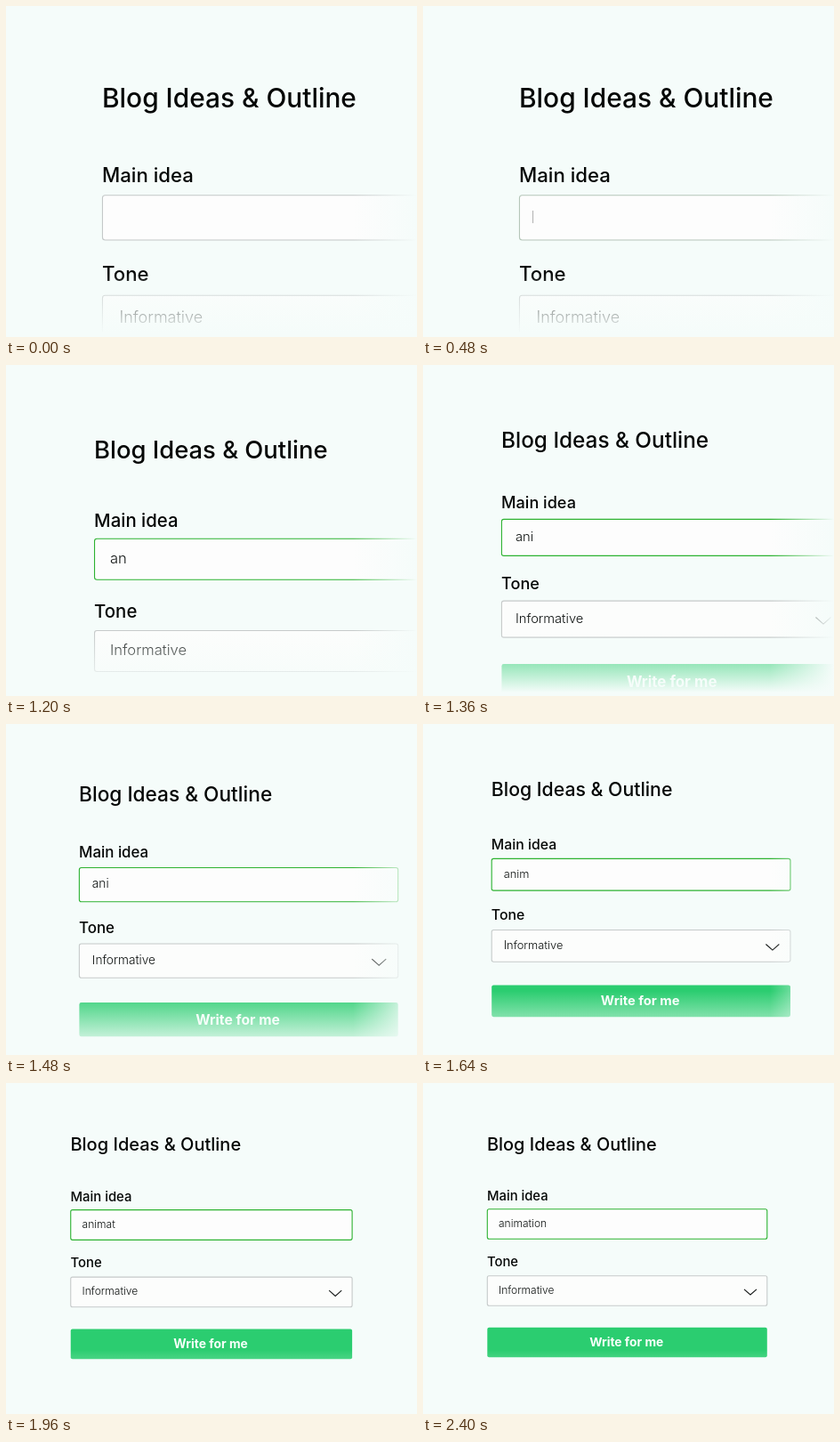
An HTML page with a canvas for the animation above (3280 ms loop, 462 px wide and 372 px high).

```html
<!DOCTYPE html>
<html lang="en">
<head>
<meta charset="utf-8">
<title>Form zoom</title>
<style>
  html, body { margin: 0; width: 100%; height: 100%; overflow: hidden; background: #f5fcfa; }
  canvas { display: block; }
</style>
</head>
<body>
<canvas id="stage" width="462" height="372"></canvas>
<script>
const ctx = document.getElementById('stage').getContext('2d');
const W = 462, H = 372, LOOP = 3280, TICK = 40;
const BG = '245,252,250';
const ZOOM_START = 1000, ZOOM_TIME = 1120;
const TYPE_START = 1010, KEY_TIME = 172, FOCUS_START = 440;
const WORD = 'animation';

const clamp = v => Math.min(1, Math.max(0, v));
const mix = (a, b, k) => `rgb(${a.map((v, i) => Math.round(v + (b[i] - v) * k))})`;

// cubic-bezier(.25, .1, .25, 1), solved by bisection
function ease(x) {
  const curve = (a, b, u) => 3 * (1 - u) ** 2 * u * a + 3 * (1 - u) * u * u * b + u ** 3;
  let lo = 0, hi = 1;
  for (let i = 0; i < 24; i++) {
    const mid = (lo + hi) / 2;
    if (curve(0.25, 0.25, mid) < x) lo = mid; else hi = mid;
  }
  return curve(0.1, 1, lo);
}

function text(str, x, y, size, weight, color, align = 'left') {
  ctx.font = `${weight} ${size}px Inter, "Open Sans", sans-serif`;
  ctx.textAlign = align;
  ctx.fillStyle = color;
  ctx.fillText(str, x, y);
}

const label = (str, y, size) => text(str, 72, y, size, 450, '#050706');
const value = (str, y) => text(str, 85, y, 12, 330, '#101413');

function box(y, fill, stroke) {
  ctx.beginPath();
  ctx.roundRect(72.3, y, 314.5, 33.5, 2);
  ctx.fillStyle = fill;
  ctx.fill();
  if (stroke) {
    ctx.strokeStyle = stroke;
    ctx.stroke();
  }
}

function fade(x0, y0, x1, y1) {
  const g = ctx.createLinearGradient(x0, y0, x1, y1);
  g.addColorStop(0, `rgba(${BG},0)`);
  g.addColorStop(1, `rgba(${BG},1)`);
  ctx.fillStyle = g;
  ctx.fillRect(x0, y0, W - x0, H - y0);
}

function draw(t) {
  const scale = 1.5 - 0.5 * ease(clamp((t - ZOOM_START) / ZOOM_TIME));
  const focus = clamp((t - FOCUS_START) / 400);
  const typed = t < TYPE_START ? 0 : Math.floor((t - TYPE_START) / KEY_TIME) + 1;

  ctx.setTransform(1, 0, 0, 1, 0, 0);
  ctx.fillStyle = `rgb(${BG})`;
  ctx.fillRect(0, 0, W, H);

  ctx.scale(scale, scale);
  ctx.lineWidth = 1.1 / scale;

  label('Blog Ideas & Outline', 76, 19.9);
  label('Main idea', 132, 14.8);
  box(141.8, '#fdfdfd', mix([196, 200, 200], [44, 178, 48], focus));
  value(WORD.slice(0, typed), 161.8);

  if (!typed && focus > 0) {
    ctx.globalAlpha = clamp((t - FOCUS_START) / 110);
    ctx.fillStyle = '#333';
    ctx.fillRect(82, 153.3, 0.7, 9.4);
    ctx.globalAlpha = 1;
  }

  label('Tone', 206, 14.8);
  box(216.8, '#fcfdfc', '#c6caca');
  value('Informative', 237);
  ctx.beginPath();
  ctx.moveTo(361, 231.8);
  ctx.lineTo(368, 238);
  ctx.lineTo(375, 231.8);
  ctx.strokeStyle = '#141817';
  ctx.stroke();

  box(274.8, '#2bcd70');
  text('Write for me', 228.7, 296.3, 13.8, 700, '#f7fffa', 'center');

  ctx.setTransform(1, 0, 0, 1, 0, 0);
  fade(390, 0, 462, 0);
  fade(0, 300, 0, 368);
}

function frame() {
  const t = performance.now() % LOOP;
  draw(Math.floor(t / TICK) * TICK);
  requestAnimationFrame(frame);
}
frame();
</script>
</body>
</html>
```
